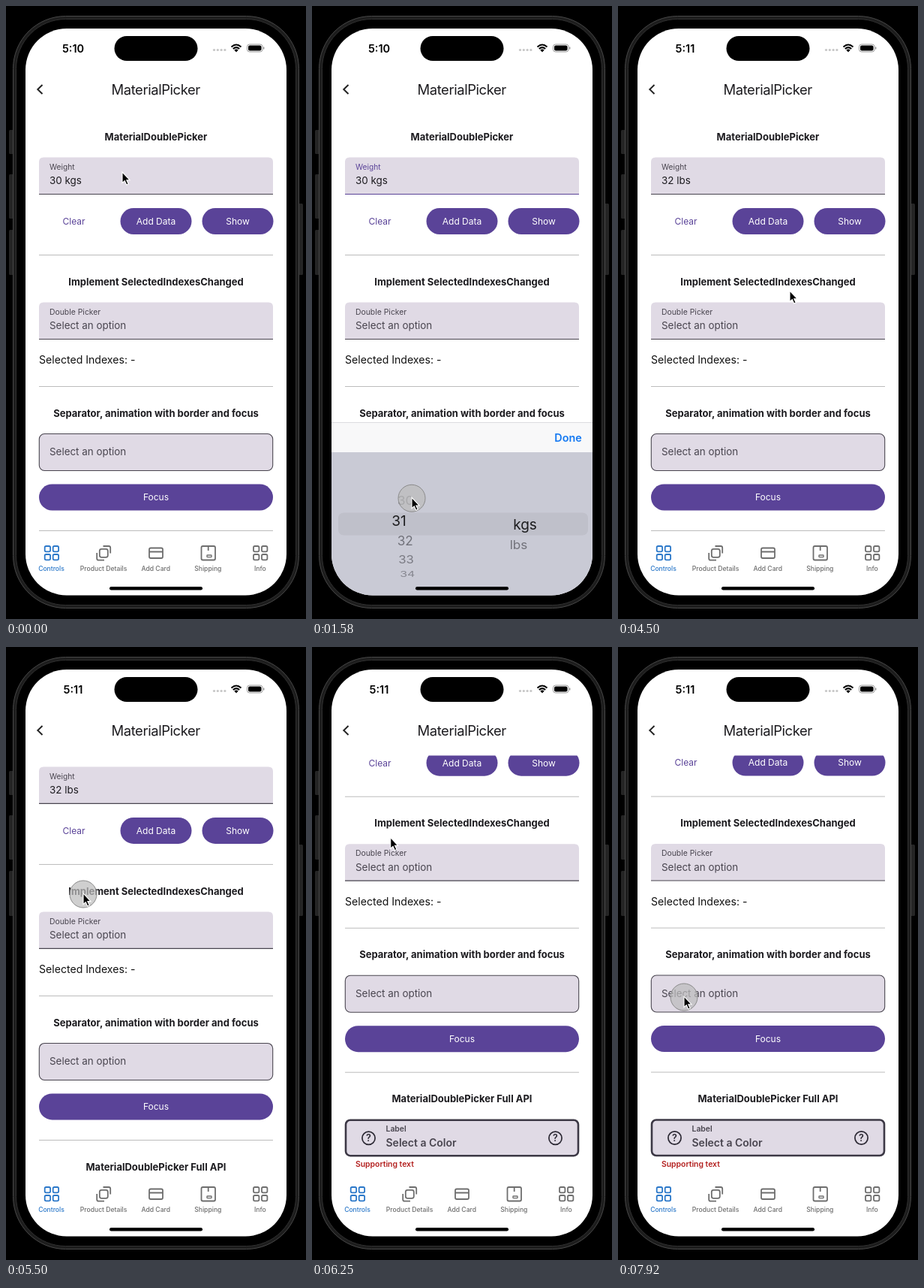
An HTML page for the animation above (8 s loop, 400 by 816 pixels).

```html
<!DOCTYPE html>
<html lang="en">
<head>
<meta charset="utf-8">
<title>Double picker demo</title>
<style>
  html, body { margin: 0; width: 100%; height: 100%; overflow: hidden; background: #000; }
  svg { display: block; width: 400px; height: 816px; }
  text { font-family: Inter, Roboto, sans-serif; white-space: pre; }
</style>
</head>
<body>
<svg id="stage" viewBox="0 0 400 816" xmlns="http://www.w3.org/2000/svg">
  <defs>
    <clipPath id="screenClip"><rect x="26" y="30" width="348" height="754.500" rx="55"/></clipPath>
    <clipPath id="pageClip"><rect x="26" y="144.500" width="348" height="565"/></clipPath>
    <clipPath id="lensClip"><rect x="26" y="674.500" width="348" height="30"/></clipPath>
    <clipPath id="wheelClip">
      <rect x="26" y="594" width="348" height="80.500"/>
      <rect x="26" y="704.500" width="348" height="80.500"/>
    </clipPath>
  </defs>
  <g id="phone"></g>
  <g clip-path="url(#screenClip)">
    <rect x="26" y="30" width="348" height="755" fill="#fff"/>
    <g clip-path="url(#pageClip)"><g id="page"></g></g>
    <g id="chrome"></g>
    <g id="panel">
      <g id="panelBase"></g>
      <g id="wheel" clip-path="url(#wheelClip)"></g>
      <g id="lens" clip-path="url(#lensClip)"></g>
    </g>
    <rect x="138" y="773" width="124" height="4.500" rx="2.250"/>
  </g>
  <g id="pointer">
    <circle id="touch" r="18" fill="#bdbdbd" fill-opacity=".72" stroke="#8a8a8a"/>
    <path d="M0 -1V13.500L3.300 10.600L5.700 16L8.200 14.900L5.800 9.700H10Z" fill="#000" stroke="#fff" stroke-width="1.100"/>
  </g>
</svg>
<script>
const LOOP = 8000;
const PURPLE = '#5a4398', INK = '#1c1b1f', MUTED = '#49454f', FIELD = '#e0dae5';
const BLUE = '#2b78c9', GRAY = '#6e6e6e';
const $ = id => document.getElementById(id);

function add(parent, tag, attrs) {
  const node = document.createElementNS('http://www.w3.org/2000/svg', tag);
  for (const key in attrs) node.setAttribute(key, attrs[key]);
  parent.appendChild(node);
  return node;
}
const rect = (parent, x, y, width, height, rx, fill, extra) =>
  add(parent, 'rect', { x, y, width, height, rx, fill, ...extra });
const line = (parent, d, stroke, width = 1, extra) =>
  add(parent, 'path', { d, stroke, 'stroke-width': width, fill: 'none', ...extra });

// y is the middle of the capital letters
function label(parent, str, x, y, size, fill, weight = 400, anchor = 'start', extra) {
  const node = add(parent, 'text', {
    x, y: y + size * 0.364, fill, 'font-size': size, 'font-weight': weight, 'text-anchor': anchor, ...extra
  });
  node.textContent = str;
  return node;
}

function drawPhone() {
  const g = $('phone');
  for (const [x, y, h] of [[4, 165, 32], [4, 224, 59], [4, 298, 60], [390, 263, 95]])
    rect(g, x, y, 6, h, 1.5, '#252525');
  rect(g, 9.5, 13.5, 381, 788, 70, '#1d1d1d', { stroke: '#484848' });
  rect(g, 13.5, 17.5, 373, 780, 66, '#000', { stroke: '#303030' });
}

function drawPage() {
  const g = $('page');
  const heading = (str, y) => label(g, str, 200, y, 13, INK, 700, 'middle');
  const separator = y => line(g, `M44 ${y}H356`, '#bcbcbc');
  const button = (str, x, y, w) => {
    rect(g, x, y, w, 35, 17.5, PURPLE);
    label(g, str, x + w / 2, y + 17.5, 12, '#fff', 400, 'middle');
  };
  const filledField = y => {
    add(g, 'path', { d: `M44 ${y + 50}v-43q0 -6 6 -6h300q6 0 6 6v43z`, fill: FIELD });
    return line(g, `M44 ${y + 50}H356`, MUTED, 1.2);
  };
  const help = x => {
    add(g, 'circle', { cx: x, cy: 786, r: 8.6, fill: 'none', stroke: '#2b2833', 'stroke-width': 1.7 });
    label(g, '?', x, 786, 12.5, '#2b2833', 600, 'middle');
  };

  heading('MaterialDoublePicker', 174);
  const underline = filledField(200.5);
  const caption = label(g, 'Weight', 58, 214, 10.2, MUTED);
  const value = label(g, '', 58, 232.5, 13.4, INK);
  label(g, 'Clear', 90.5, 286.5, 12, PURPLE, 400, 'middle');
  button('Add Data', 152.5, 269, 95);
  button('Show', 261.5, 269, 95);
  separator(331.5);

  heading('Implement SelectedIndexesChanged', 367);
  filledField(393.5);
  label(g, 'Double Picker', 58, 407, 10.4, MUTED);
  label(g, 'Select an option', 58, 425.5, 13.4, MUTED);
  label(g, 'Selected Indexes: -', 44, 471, 14.1, '#111');
  separator(506.5);

  heading('Separator, animation with border and focus', 542);
  rect(g, 44.3, 569.5, 311.4, 49, 7, FIELD, { stroke: MUTED, 'stroke-width': 1.1 });
  label(g, 'Select an option', 58, 593.5, 13.4, MUTED);
  button('Focus', 44, 636.5, 312);
  separator(698.5);

  heading('MaterialDoublePicker Full API', 734);
  rect(g, 45, 762, 310, 47.5, 6, FIELD, { stroke: '#3c3845', 'stroke-width': 2.6 });
  help(75.5);
  help(324.5);
  label(g, 'Label', 98.5, 774, 10.4, MUTED, 600);
  label(g, 'Select a Color', 98.5, 792, 14, MUTED, 600);
  label(g, 'Supporting text', 58, 820.5, 10.4, '#b3201f', 600);
  return { underline, caption, value };
}

function drawChrome() {
  const g = $('chrome');
  const clock = label(g, '', 89.5, 56.5, 14.5, '#000', 600, 'middle');
  rect(g, 144.5, 40, 111, 33, 16.5, '#000');
  for (let i = 0; i < 4; i++) add(g, 'circle', { cx: 277.5 + i * 4.8, cy: 58.5, r: 1.6, fill: '#c6c6c6' });
  line(g, 'M300.500 54.500Q307 48.500 313.500 54.500M302.800 57Q307 53.200 311.200 57', '#000', 2);
  add(g, 'path', { d: 'M304.300 58.600Q307 56.500 309.700 58.600L307 61.400Z' });
  rect(g, 321.5, 51, 20.5, 10, 3.2, 'none', { stroke: '#999' });
  rect(g, 323, 52.5, 17.5, 7, 2, '#000');
  rect(g, 343, 54.3, 1.4, 3.4, 0.7, '#999');

  line(g, 'M48.500 105L42.300 111L48.500 117', '#222', 2);
  label(g, 'MaterialPicker', 199.7, 111, 18.4, INK, 400, 'middle', { 'letter-spacing': -0.4 });

  const names = ['Controls', 'Product Details', 'Add Card', 'Shipping', 'Info'];
  const grid = (x, color) => {
    for (const dx of [-9, 2]) for (const dy of [-9, 2])
      rect(g, x + dx, 728 + dy, 7.4, 7.4, 1.8, 'none', { stroke: color, 'stroke-width': 1.8 });
  };
  names.forEach((name, i) =>
    label(g, name, 60.5 + i * 69.6, 748.5, 8.6, i ? GRAY : BLUE, 500, 'middle'));
  grid(60.7, BLUE);
  grid(339, GRAY);
  const outline = { stroke: GRAY, 'stroke-width': 1.8 };
  rect(g, 124.8, 722.8, 11, 11, 2.5, 'none', outline);
  line(g, 'M129.500 719H137q2.200 0 2.200 2.200V728.500M121.200 728V735.500q0 2.200 2.200 2.200H131', GRAY, 1.8);
  rect(g, 191, 721.5, 18, 13.5, 2, 'none', outline);
  line(g, 'M191 726.500H209', GRAY, 1.8);
  rect(g, 260.5, 719, 18.5, 18.5, 2, 'none', outline);
  line(g, 'M269.700 719V725', GRAY, 1.8);
  rect(g, 268, 731, 6, 2.6, 0.5, 'none', { ...outline, 'stroke-width': 1.4 });
  return clock;
}

function drawPanel() {
  const g = $('panelBase');
  rect(g, 26, 554, 348, 40, 0, '#f8f8f9');
  line(g, 'M26 554.500H374', '#dcdce0');
  rect(g, 26, 594, 348, 191, 0, '#c9cad5');
  rect(g, 35, 674.5, 333, 30, 7, '#bfc0ca');
  label(g, 'Done', 341.5, 574.5, 14.4, '#1579f2', 600, 'middle');
}

const WHEEL_RADIUS = 82, WHEEL_STEP = 19.2 * Math.PI / 180;

// side is -1 for the left column and 1 for the right one
function makeColumn(items, side) {
  const rows = items.map(str => ({
    rim: label($('wheel'), str, 0, 0, 17.3, '#1c1c22', 400, 'middle'),
    lens: label($('lens'), str, 200 + side * 84, 0, 19, '#1c1c1e', 400, 'middle')
  }));
  return position => rows.forEach(({ rim, lens }, i) => {
    const angle = (i - position) * WHEEL_STEP;
    const shown = Math.abs(angle) < 1.25;
    const depth = Math.cos(angle), y = 690 + WHEEL_RADIUS * Math.sin(angle);
    rim.style.display = lens.style.display = shown ? '' : 'none';
    if (!shown) return;
    const x = 200 + side * (76 - 8 * (1 - depth));
    rim.setAttribute('transform', `translate(${x} ${y}) scale(${0.8 + 0.2 * depth} ${depth})`);
    rim.setAttribute('opacity', 0.2 + 0.32 * depth);
    lens.setAttribute('transform', `translate(0 ${y})`);
  });
}

drawPhone();
const page = drawPage(), clock = drawChrome();
drawPanel();
const setNumber = makeColumn(['30', '31', '32', '33', '34', '35', '36', '37'], -1);
const setUnit = makeColumn(['kgs', 'lbs'], 1);

// each step: time, then the values reached at that time
const cursorSteps = [
  [0, 155, 222], [150, 155, 225], [600, 155, 225], [1150, 133, 688], [1250, 133, 688],
  [1840, 133, 633], [2000, 133, 633], [2500, 320, 686], [2650, 320, 686], [2950, 320, 655],
  [3200, 320, 652], [3300, 320, 652], [3650, 341, 575], [3900, 341, 575], [4480, 229, 380],
  [4550, 229, 380], [5050, 103, 371], [5200, 103, 371], [5950, 103, 250], [6150, 103, 250],
  [6700, 124, 308], [6850, 124, 308], [7500, 88, 462.5], [7700, 88, 462.5], [8000, 88, 466.7]
];
const numberSteps = [[1250, 0], [1840, 2]];
const unitSteps = [[2650, 0], [3000, 1]];
const scrollSteps = [[5200, 0], [5950, 121], [6400, 136], [7700, 136], [8000, 131.8]];
const touches = [[220, 370], [1180, 1880], [2590, 2980], [3680, 3820], [5110, 5970], [7610, 8000]];
const values = [[0, '30 kgs'], [1900, '32 kgs'], [3060, '32 lbs']];

function at(steps, t) {
  const next = steps.findIndex(step => step[0] > t);
  if (next < 0) return steps[steps.length - 1].slice(1);
  if (next === 0) return steps[0].slice(1);
  const a = steps[next - 1], b = steps[next];
  const k = 0.5 - 0.5 * Math.cos(Math.PI * (t - a[0]) / (b[0] - a[0]));
  return a.slice(1).map((v, i) => v + (b[i + 1] - v) * k);
}
const easeOut = (t, start, length) => 1 - (1 - Math.min(1, Math.max(0, (t - start) / length))) ** 3;

function render(t) {
  const [x, y] = at(cursorSteps, t);
  $('pointer').setAttribute('transform', `translate(${x} ${y})`);
  $('touch').style.display = touches.some(([from, to]) => t >= from && t < to) ? '' : 'none';

  const open = easeOut(t, 400, 420) - easeOut(t, 3820, 400);
  $('panel').setAttribute('transform', `translate(0 ${231 * (1 - open)})`);
  $('panel').style.display = open > 0 ? '' : 'none';
  setNumber(at(numberSteps, t)[0]);
  setUnit(at(unitSteps, t)[0]);

  const focused = t >= 380 && t < 3820;
  page.caption.setAttribute('fill', focused ? PURPLE : MUTED);
  page.underline.setAttribute('stroke', focused ? PURPLE : MUTED);
  page.value.textContent = values.filter(step => step[0] <= t).pop()[1];
  clock.textContent = t < 4050 ? '5:10' : '5:11';
  $('page').setAttribute('transform', `translate(0 ${-at(scrollSteps, t)[0]})`);
}

const begin = performance.now();
function tick() {
  render((performance.now() - begin) % LOOP);
  requestAnimationFrame(tick);
}
tick();
</script>
</body>
</html>
```
